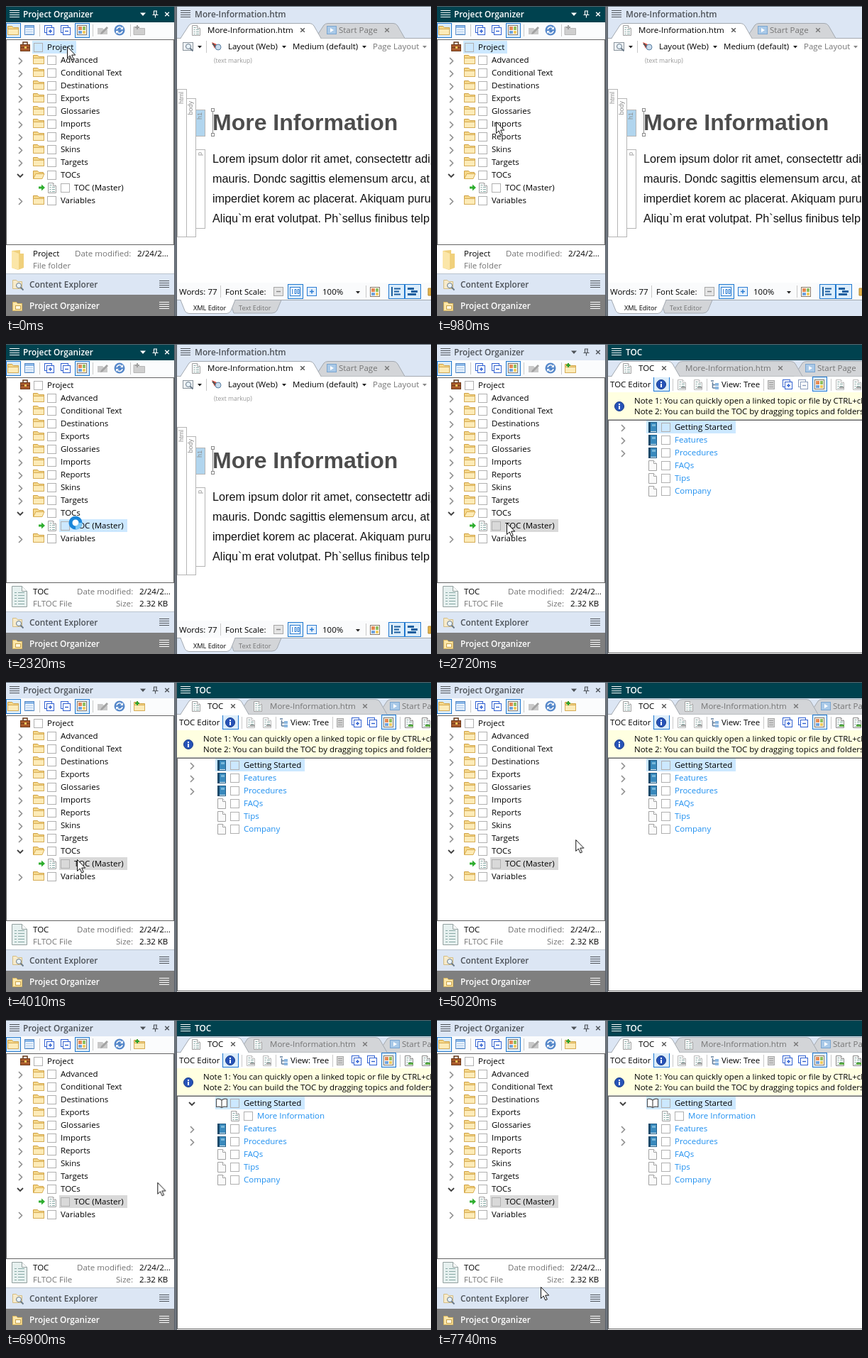
Recreate the animation shown at these times as an HTML page. Size 599x437 px, loop 8000 ms.

```html
<!DOCTYPE html>
<html lang="en">
<head>
<meta charset="utf-8">
<title>Project organizer</title>
<style>
html, body { margin: 0; width: 100%; height: 100%; overflow: hidden; background: #fff; }
svg { display: block; width: 599px; height: 437px; }
text { font: 11.5px "Open Sans", "Noto Sans", sans-serif; fill: #000; white-space: pre; }
.b { font-weight: 600; font-size: 11.8px; }
.s { font-size: 9.2px; }
.g { fill: #747474; }
.d { fill: #4d5258; }
.w { fill: #fff; }
.l { fill: #1e8ff0; }
.m { font-size: 8.6px; fill: #999; }
.v { font: 9px "Liberation Sans", Arial, sans-serif; fill: #8d8d8d; text-anchor: end; }
.h { font: bold 32px "Liberation Sans", Arial, sans-serif; fill: #4d4d4d; }
.p { font: 16.2px "Liberation Sans", Arial, sans-serif; fill: #111; }
.cursor { animation: move 8s infinite; }
@keyframes move {
  0% { transform: translate(86px, 57px); }
  7.75% { transform: translate(86px, 57px); animation-timing-function: steps(4, start); }
  13.75% { transform: translate(83px, 163px); animation-timing-function: steps(3, start); }
  18.25% { transform: translate(91px, 235px); animation-timing-function: steps(2, start); }
  21.25% { transform: translate(98px, 252px); }
  50.125% { transform: translate(98px, 252px); animation-timing-function: step-start; }
  51.625% { transform: translate(100px, 250px); animation-timing-function: steps(3, start); }
  56.125% { transform: translate(136px, 307px); }
  60.875% { transform: translate(136px, 307px); animation-timing-function: step-start; }
  62.75% { transform: translate(178px, 248px); animation-timing-function: steps(5, start); }
  70.25% { transform: translate(264px, 118px); }
  81.5% { transform: translate(264px, 118px); animation-timing-function: step-start; }
  83.25% { transform: translate(263px, 122px); animation-timing-function: steps(7, start); }
  93.75% { transform: translate(147px, 371px); animation-timing-function: steps(3, start); }
  98.25%, 100% { transform: translate(146px, 376px); }
}
</style>
</head>
<body>
<svg id="stage" viewBox="0 0 599 437"></svg>
<script>
const LOOP = 8000;
const TEAL = '#00424f', PALE = '#dce6f4', BLUE = '#2b7cd3', PICK = '#cce8ff', FRAME = '#646464';
let css = '', ranges = 0;

const rect = (x, y, w, h, fill, line) => line
  ? `<rect x="${x + .5}" y="${y + .5}" width="${w - 1}" height="${h - 1}" fill="${fill}" stroke="${line}"/>`
  : `<rect x="${x}" y="${y}" width="${w}" height="${h}" fill="${fill}"/>`;
const path = (d, fill = 'none', line = 'none', width = 1) =>
  `<path d="${d}" fill="${fill}" stroke="${line}" stroke-width="${width}"/>`;
const text = (x, y, s, cls = '') => `<text x="${x}" y="${y}" class="${cls}">${s}</text>`;
const at = (x, y, s) => `<g transform="translate(${x} ${y})">${s}</g>`;

// Shows a group between two times of the loop
function show(from, to, s) {
  const name = 'show' + ranges++, pc = ms => ms / LOOP * 100 + '%';
  const key = (ms, v) => `${pc(ms)}{visibility:${v}}`;
  css += `.${name}{animation:${name} ${LOOP}ms step-end infinite}@keyframes ${name}{` +
    (from ? key(0, 'hidden') : '') + key(from, 'visible') +
    (to < LOOP ? key(to, 'hidden') + key(LOOP, 'hidden') : key(LOOP, 'visible')) + '}';
  return `<g class="${name}">${s}</g>`;
}

// Icons, drawn around their centre
const burger = (x, y, c, w = 14) => [-5, -2, 1, 4].map(d => rect(x, y + d, w, 1, c)).join('');
const cross = (x, y, c, r = 2.8) => at(x, y, path(`M${-r} ${-r}L${r} ${r}M${r} ${-r}L${-r} ${r}`, 'none', c, 1.4));
const drop = (x, y, c = '#222', r = 3) => path(`M${x - r} ${y - 1}h${2 * r}l${-r} ${r + .4}z`, c);
const check = (x, y, fill = '#fff') => rect(x - 6, y - 6, 13, 13, fill, '#b0b0b0');
const right = (x, y, c = '#8c8c8c') => path(`M${x - 2} ${y - 4}l4.5 4.5l-4.5 4.5`, 'none', c, 1.5);
const down = (x, y, c = '#404040') => path(`M${x - 4} ${y - 2}l4 4l4 -4`, 'none', c, 1.8);
const folder = (x, y) => at(x, y,
  path('M-7.5 -6.5h6l2 2h7v10h-15z', '#f5d88a', '#cfa044') + path('M-7.5 -2.5h15v8h-15z', '#fdebb8', '#d6ac55'));
const openFolder = (x, y) => at(x, y,
  path('M-7.5 5.5v-11h6l2 2h6v3', '#f6d88a', '#cfa044') + path('M-7.5 5.5l3.5 -7h12l-3 7z', '#fdeab4', '#d9ae51'));
const page = (x, y, lines, c = '#a2a2a2') => at(x, y,
  path('M-5.5 -6.5h7l4 4v10h-11z', '#fafafa', c) + path('M1.5 -6.5v4h4', '#fff', c) + (lines
    ? path('M-3.5 -3.5h3M-3.5 -.5h2M0 -.5h4M-3.5 2.5h2M0 2.5h4M-3.5 5.5h2M0 5.5h4', 'none', '#85aaa5') : ''));
const book = (x, y) => at(x, y,
  rect(-6, -7, 12, 15, '#3a8abd', '#215e88') + rect(-6, -7, 3, 15, '#1c4a6b') + rect(-1, -4, 5, 3, '#79b8da') +
  path('M-3 6.5h8', 'none', '#e3eef4'));
const openBook = (x, y) => at(x, y,
  path('M0 -4q-3 -2.5 -7.5 -1.5v11q4.5 -1 7.5 1q3 -2 7.5 -1v-11q-4.5 -1 -7.5 1.500v10.5', '#fff', '#555', 1.2));
const briefcase = (x, y) => at(x, y,
  path('M-3 -4v-3h6v3', 'none', '#623619', 1.5) + rect(-7, -4, 14, 10, '#a85a2c', '#6e3a1b') +
  rect(-7, 0, 14, 1, '#6e3a1b') + rect(-1, -1, 3, 3, '#f0c75b'));
const stack = (x, y, sign, c = '#2f5fd0') => at(x, y,
  rect(-7, -7, 11, 11, '#fff', c) + rect(-4, -4, 11, 11, '#fff', c) +
  path('M-1 1.5h5' + (sign ? 'M1.5 -1v5' : ''), 'none', c, 1.4));
const grid = (x, y) => at(x, y, rect(-7, -7, 14, 14, '#fff', '#8a7a66') + rect(-5, -5, 5, 5, '#e58a55') +
  rect(1, -5, 4, 5, '#8fbf5f') + rect(-5, 1, 5, 4, '#6fa3dc') + rect(1, 1, 4, 4, '#f3cb5c'));
const list = (x, y) => at(x, y, rect(-7, -7, 14, 14, '#edf5ff', '#578bc7') + rect(-6, -6, 12, 3, '#8db9e8') +
  path('M-5 -.5h10M-5 2.5h10M-5 5.5h10', 'none', '#a5c5e5'));
const pressed = (x, y, w, h) => rect(x, y, w, h, '#dcedfb', '#1f78cf');
const bar = (x, y, h) => rect(x, y, 1, h, '#c8c8c8');
const info = (x, y) => at(x, y, '<circle r="6.5" fill="#2753b8" stroke="#173a87"/>' +
  rect(-1, -4, 2, 2, '#fff') + rect(-1, -1, 2, 5, '#fff'));
const lens = (x, y) => at(x, y, '<circle cx="1" cy="0" r="3.5" fill="#e8f3fb" stroke="#687887"/>' +
  path('M3.5 2.5l4 4', 'none', '#687887', 1.8));
const toolPage = (x, y, on) => page(x, y, true, on ? '#888' : '#bbb') +
  path(`M${x - 1} ${y + 4.5}h7`, 'none', on ? '#58a942' : '#aaa', 3);

function header(x, w, title, active) {
  const c = active ? '#fff' : '#4d5258';
  return rect(x, 1, w, 22, active ? TEAL : PALE) + burger(x + 5, 11, c) + text(x + (x ? 25 : 24), 16, title, active ? 'b w' : 'b d');
}
const leftHeader = active => {
  const c = active ? '#fff' : '#4d5258';
  return header(0, 237, 'Project Organizer', active) + drop(193, 10.5, c, 4) +
    path('M208 7h5M208.5 7v5M212 7v5M206.5 12.5h8M210.5 12.5v4', 'none', c, 1.2) + cross(227, 11.5, c);
};

function tab(a, b, fill) {
  return path(`M${a} 45.5L${a + 12} 27Q${a + 14} 24.5 ${a + 18} 24.5H${b - 8}Q${b - 4} 24.5 ${b - 2} 28L${b + 8} 45.5`, fill, '#a3a9b0');
}
const startTab = x => tab(x - 17, x + 101, '#d3d5d8') +
  rect(x - 1, 28, 14, 12, '#a9c9e8', '#7ba5cf') + path(`M${x + 4} 31l5 3l-5 3z`, '#fff') +
  text(x + 16, 38, 'Start Page', 'g') + cross(x + 84, 34, '#777');

function leftTree() {
  const names = ['Advanced', 'Conditional Text', 'Destinations', 'Exports', 'Glossaries', 'Imports', 'Reports', 'Skins', 'Targets', 'TOCs', '', 'Variables'];
  let s = briefcase(27, 58) + check(45, 58, 'none') + text(58, 62, 'Project');
  names.forEach((n, i) => {
    const y = 76 + i * 18;
    if (!n) return;
    s += (n == 'TOCs' ? down(20, y + 1) + openFolder(46, y) : right(20, y + 1) + folder(46, y)) + check(64, y) + text(77, y + 4, n);
  });
  return s + path('M46 254.5h4v-3l5 4.5l-5 4.5v-3h-4z', '#2fae2f') + page(65, 256, true) +
    check(83, 256, 'none') + text(96, 260, 'TOC (Master)');
}

function leftTools() {
  return rect(0, 23, 237, 24, '#fbfcfd') + pressed(0, 24, 21, 21) + folder(10, 35) + list(33, 34) + bar(47, 26, 17) +
    stack(61, 34, true) + stack(84, 34, false) + pressed(97, 24, 21, 21) + grid(107, 34) + bar(122, 26, 17) +
    at(137, 34, path('M-8 -3h7l2 2h5v7h-14z', '#c9c9c9') + path('M-3 3l8 -8l2 2l-8 8l-3 1z', '#a2a2a2')) +
    at(160, 34, '<circle r="7.5" fill="#5688ca"/>' + path('M-4 -1a4 4 0 0 1 7 -2M4 1a4 4 0 0 1 -7 2', 'none', '#fff', 1.6) +
      path('M5 -5v4h-4zM-5 5v-4h4z', '#fff')) + bar(175, 26, 17);
}
const addFolder = on => (on ? folder(188, 35) : at(188, 35, path('M-8 -5.5h6l2 2h7.5v9h-15.5z', '#cfcfcf', '#b5b5b5'))) +
  path('M185 27v6M182 30h6', 'none', on ? '#2ba12b' : '#a0a0a0', 2);

function dock() {
  return rect(0, 377, 237, 1, '#b9c3cf') + rect(0, 378, 237, 29, PALE) + rect(0, 407, 237, 30, '#7f7f7f') +
    path('M9.5 386.5h5l2 2h6v10h-13z', '#f7ebcb', '#d3bd85') + lens(17, 394) +
    text(33, 397, 'Content Explorer', 'b d') + burger(216, 392, '#4d5258') +
    path('M9.5 417.5h5l2 2h6v10h-13z', '#fbe6a9', '#d9b65c') + rect(13, 422, 8, 6, '#fff8e2', '#c9a24a') +
    text(33, 427, 'Project Organizer', 'b w') + burger(216, 422, '#fff');
}
const details = (x, name, kind) => text(38, 353, name) + text(x, 353, 'Date modified:', 'g') +
  text(x + 88, 353, '2/24/2...') + text(38, 370, kind, 'g');
const projectInfo = () => path('M8 345l12 -1v5h5v20l-8 3l-9 -3z', '#f0d07c') +
  path('M8 345l10 4v23l-10 -3z', '#fbe6a8') + details(97, 'Project', 'File folder');
const tocInfo = () => path('M8.5 341.5h14l7 7v22h-21z', '#e6f0ef', '#93a09f') + path('M22.5 341.5v7h7', '#fff', '#93a09f') +
  [350, 354, 358, 362, 366].map(y => path(`M12 ${y}.5h3M17 ${y}.5h9`, 'none', '#86a8a4')).join('') +
  details(100, 'TOC', 'FLTOC File') + text(155, 370, 'Size:', 'g') + text(188, 370, '2.32 KB');

function topicEditor() {
  const tag = (x, y, w, h, name, fill = '#fff') => rect(x, y, w, h, fill, '#b5b5b5') +
    `<text class="v" transform="translate(${x + 9} ${y + 4}) rotate(-90)">${name}</text>`;
  const lines = ['Lorem ipsum dolor rit amet, consectettr adip', 'mauris. Dondc sagittis elemensum arcu, at',
    'imperdiet korem ac placerat. Akiquam purus', 'Aliqu`m erat volutpat. Ph`sellus finibus telp'];
  return header(241, 358, 'More-Information.htm', false) + rect(241, 23, 358, 23, PALE) +
    rect(241, 45, 358, 1, '#a3a9b0') + startTab(453) + tab(246, 436, '#fff') + rect(247, 45, 196, 2, '#fff') +
    page(268, 34, true) + text(284, 38, 'More-Information.htm') + cross(418, 34, '#555') +
    rect(249, 51, 15, 12, '#eef2f5', '#8a949c') + lens(256, 57) + drop(273, 57) + bar(282, 49, 17) +
    path('M290 51l7 3l-3 6z', '#d9483a') + path('M291 53l8 8', 'none', '#555', 2) + '<circle cx="299" cy="58" r="4" fill="#c9dced" stroke="#5b7ea0"/>' +
    text(313, 61, 'Layout (Web)') + drop(392, 57) + text(404, 61, 'Medium (default)') + drop(505, 57) +
    text(517, 61, 'Page Layout', 'g') + drop(590, 57, '#888') + text(293, 80, '(text markup)', 'm') +
    tag(241, 117, 14, 209, 'html') + tag(254, 130, 14, 196, 'body') + tag(267, 146, 14, 38, 'h1', '#b1d5ee') + tag(267, 202, 14, 112, 'p') +
    path('M291.5 149v30', 'none', '#8a8a8a') + rect(289, 144, 5, 5, '#fff', '#8a8a8a') + rect(289, 179, 5, 5, '#fff', '#8a8a8a') +
    text(291, 175, 'More Information', 'h') + lines.map((s, i) => text(291, 221 + i * 28, s, 'p')).join('') + status();
}

function status() {
  const layout = x => path(`M${x - 6} 396v13M${x - 3} 398.5h9M${x - 3} 402.5h7M${x - 3} 406.5h9`, 'none', '#1d5f9f', 2);
  return rect(241, 390, 358, 24, '#fafbfc') + text(244, 407, 'Words: 77') + bar(302, 394, 17) + text(309, 407, 'Font Scale:') +
    rect(377, 396, 14, 13, '#e5e5e5', '#a6a6a6') + path('M381 402.5h6', 'none', '#888', 1.5) +
    pressed(397, 392, 22, 21) + rect(400, 396, 15, 13, '#fff', BLUE) + path('M403.5 399v7M407 399.5h2v6h-2zM411 399.5h2v6h-2z', 'none', BLUE) +
    rect(424, 396, 14, 13, '#e4f0fc', BLUE) + path('M428 402.5h6M431 399.5v6', 'none', BLUE, 1.5) +
    text(446, 407, '100%') + drop(496, 403) + bar(507, 394, 17) + grid(520, 403) +
    pressed(539, 392, 23, 21) + layout(550) + pressed(562, 392, 23, 21) + path('M566 398.5h9M571 402.5h9M566 406.5h12', 'none', '#1d5f9f', 3) +
    path('M595 398h4v10h-4z', '#e5b44c', '#b4872e') +
    rect(241, 414, 358, 23, PALE) + rect(241, 414, 358, 1, '#a3a9b0') +
    path('M312 418.5h4l5 14.5h54q5 0 7 -4l6 -14.5h-76z', '#d3d5d8', '#a3a9b0') +
    path('M246 414.5l6 15q2 4 6 4h53q4 0 6 -4l6 -15', '#fff', '#a3a9b0') + rect(247, 414, 75, 1, '#fff') +
    text(264, 429, 'XML Editor', 's') + text(328, 429, 'Text Editor', 's g');
}

// x is where the second tab's title starts
function tocTabs(x, icon) {
  return rect(241, 23, 358, 23, PALE) + rect(241, 45, 358, 1, '#a3a9b0') + startTab(x + 170) +
    tab(328, x + 157, '#d3d5d8') + icon + text(x, 38, 'More-Information.htm', 'g') + cross(x + 134, 34, '#777') +
    tab(246, 334, '#fff') + rect(247, 45, 94, 2, '#fff') + page(268, 34, true) + text(284, 38, 'TOC') + cross(320, 34, '#555');
}
const tocIcons = on => stack(494, 57, true) + stack(516, 57, false, on ? '#2f5fd0' : '#8a9cbc') +
  toolPage(568, 57, on) + toolPage(592, 57, on);

function tocEditor() {
  return header(241, 358, 'TOC', true) + rect(241, 46, 358, 22, '#fff') + text(244, 61, 'TOC Editor') +
    pressed(305, 46, 23, 21) + info(316, 57) + bar(332, 49, 17) + toolPage(345, 57) + toolPage(368, 57) + bar(380, 49, 17) +
    path('M386 52h4M388.5 54v8M388.5 57.5h4M388.5 62h4', 'none', '#607d9c', 1.5) + rect(392, 55, 5, 4, '#8bb6df') + rect(392, 60, 5, 4, '#8bb6df') +
    text(401, 61, 'View: Tree') + bar(460, 49, 17) + rect(466, 51, 10, 13, '#d5d5d5', '#aaa') + path('M468 54.5h6M468 57.5h6M468 60.5h6', 'none', '#999') +
    pressed(529, 46, 21, 21) + grid(539, 57) + bar(555, 49, 17) +
    rect(241, 107, 360, 329, '#fff', FRAME) + rect(241, 68, 358, 39, '#ffffe1') + rect(241, 106, 358, 1, '#b5b7b4') + info(257, 88) +
    text(278, 84, 'Note 1: You can quickly open a linked topic or file by CTRL+clicking') +
    text(278, 99, 'Note 2: You can build the TOC by dragging topics and folders') +
    rect(295, 108, 126, 18, PICK) + check(322, 117, 'none') + text(335, 121, 'Getting Started');
}
const tocRows = y0 => ['Features', 'Procedures', 'FAQs', 'Tips', 'Company'].map((n, i) => {
  const y = y0 + i * 18;
  return (i < 2 ? right(262, y + 1) + book(304, y) : page(304, y)) + check(322, y) + text(335, y + 4, n, 'l');
}).join('');

const spinner = turn => at(98, 252, `<g transform="rotate(${turn})"><circle r="7" fill="#fff" stroke="#1a86d9" stroke-width="5"/>` +
  path('M0 -7a7 7 0 0 1 7 7', 'none', '#7cc8f7', 5) + '</g>');
const arrow = `<g class="cursor">${path('M.5 .5v16l3.7 -3.5l2.6 6l2.5 -1.1l-2.6 -5.8h5z', '#fff', '#111')}</g>`;

document.getElementById('stage').innerHTML =
  rect(0, 0, 599, 437, '#fff') +
  show(0, 2720, leftHeader(true) + topicEditor()) +
  show(2720, LOOP, leftHeader(false) + tocEditor()) +
  show(2720, 2870, tocTabs(350, '')) + show(2870, LOOP, tocTabs(372, page(355, 34, true))) +
  show(2720, 3000, tocIcons(false)) + show(3000, LOOP, tocIcons(true)) +
  show(2720, 5500, right(262, 118)) + show(5500, 5900, right(262, 118, '#29bfe8')) +
  show(2720, 5900, book(304, 117) + tocRows(135)) +
  show(5900, LOOP, openBook(304, 117) + page(323, 135, true) + check(341, 135) + text(354, 139, 'More Information', 'l') + tocRows(153)) +
  show(5900, 6660, down(262, 118, '#29bfe8')) + show(6660, LOOP, down(262, 118)) +
  leftTools() + show(0, 2720, addFolder(false)) + show(2720, LOOP, addFolder(true)) +
  rect(0, 47, 237, 290, '#fff', FRAME) +
  show(0, 1960, rect(37, 49, 62, 18, PICK)) +
  show(1960, 2720, rect(75, 247, 96, 18, PICK)) + show(2720, LOOP, rect(75, 247, 96, 18, '#d9d9d9')) +
  leftTree() + dock() + show(0, 2080, projectInfo()) + show(2080, LOOP, tocInfo()) +
  rect(237, 0, 4, 437, '#596069') + rect(238, 0, 2, 437, '#6f767e') + rect(0, 0, 599, 1, '#59656d') +
  show(2200, 2320, spinner(0)) + show(2320, 2720, spinner(90)) +
  show(0, 2200, arrow) + show(2720, LOOP, arrow);

const sheet = document.createElement('style');
sheet.textContent = css;
document.head.append(sheet);
</script>
</body>
</html>
```
